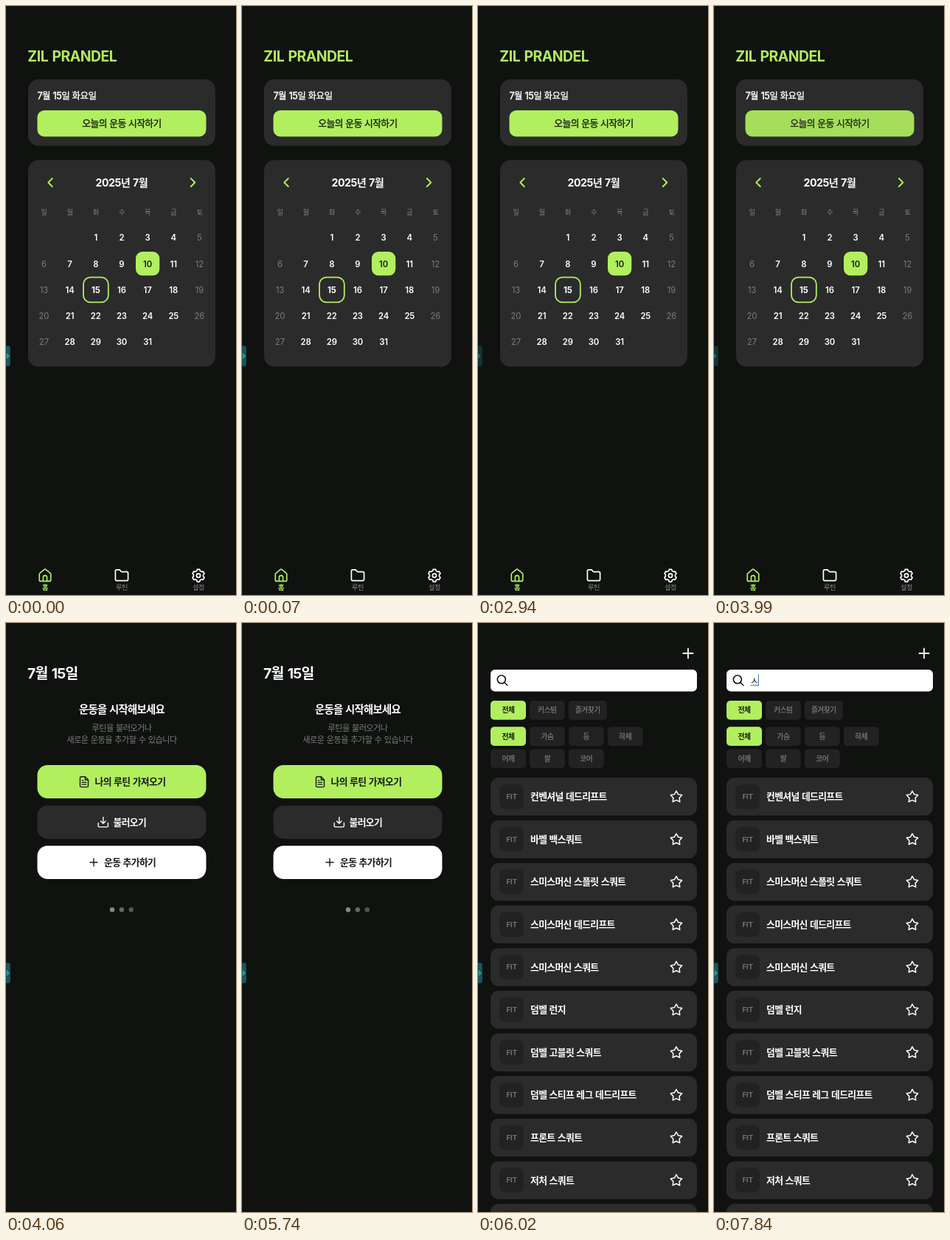
Write an HTML page with a canvas that moves like this. It is 312x796 px and loops after 8000 ms.

```html
<!DOCTYPE html>
<html lang="ko">
<head>
<meta charset="utf-8">
<title>운동 플래너</title>
<style>
html, body { margin: 0; width: 100%; height: 100%; overflow: hidden; background: #0f120f; }
canvas { display: block; width: 312px; height: 796px; }
</style>
</head>
<body>
<canvas id="stage"></canvas>
<script>
const W = 312, H = 796, LOOP = 8000, STEP = 70;
const BG = '#0f120f', CARD = '#2b2b2b', CHIP = '#222222', LIME = '#b1ef5f';
const INK = '#171b12', GREY = '#7c7c7c', WHITE = '#ffffff';
const FONT = 'Inter, "Noto Sans CJK KR", "Noto Sans CJK JP", "Noto Sans CJK", sans-serif';

const canvas = document.getElementById('stage');
const ctx = canvas.getContext('2d');
const ratio = window.devicePixelRatio || 1;
canvas.width = W * ratio;
canvas.height = H * ratio;

function box(x, y, w, h, r, fill) {
  ctx.beginPath();
  ctx.roundRect(x, y, w, h, r);
  ctx.fillStyle = fill;
  ctx.fill();
}

function pen(color, width) {
  ctx.strokeStyle = color;
  ctx.lineWidth = width;
  ctx.lineCap = ctx.lineJoin = 'round';
}

// y is the vertical middle of the letters
function text(str, x, y, size, color, weight = 500, align = 'left', tracking = -0.05) {
  ctx.font = `${weight} ${size}px ${FONT}`;
  ctx.letterSpacing = `${(size * tracking).toFixed(2)}px`;
  ctx.wordSpacing = `${(size * 0.06).toFixed(2)}px`;
  ctx.textAlign = align;
  ctx.fillStyle = color;
  const base = y + size * 0.355;
  ctx.fillText(str, x, base);
  // Hangul has no medium cut, so a hairline outline supplies it
  if (weight === 500) {
    pen(color, size * 0.025);
    ctx.strokeText(str, x, base);
  }
}

function line(color, width, ...pts) {
  ctx.beginPath();
  for (let i = 0; i < pts.length; i += 2) ctx.lineTo(pts[i], pts[i + 1]);
  pen(color, width);
  ctx.stroke();
}

// Icons live on a 24-unit grid and are centred on x, y
const ICONS = {
  home: 'M3 10a2 2 0 0 1 .7-1.5l7-6a2 2 0 0 1 2.6 0l7 6A2 2 0 0 1 21 10v9a2 2 0 0 1-2 2H5a2 2 0 0 1-2-2z M9 21v-6a3 3 0 0 1 6 0v6',
  folder: 'M4 20h16a2 2 0 0 0 2-2V8a2 2 0 0 0-2-2h-7.9a2 2 0 0 1-1.7-.9l-.8-1.2A2 2 0 0 0 7.9 3H4a2 2 0 0 0-2 2v13a2 2 0 0 0 2 2z',
  doc: 'M14 2H6a2 2 0 0 0-2 2v16a2 2 0 0 0 2 2h12a2 2 0 0 0 2-2V8z M14 2v6h6 M8 9h2 M8 13h8 M8 17h8',
  download: 'M2 14v6a2 2 0 0 0 2 2h16a2 2 0 0 0 2-2v-6 M7 10l5 5 5-5 M12 15V2',
};
for (const name in ICONS) ICONS[name] = new Path2D(ICONS[name]);

function icon(name, x, y, scale, color, width = 1.7) {
  ctx.save();
  ctx.translate(x, y);
  ctx.scale(scale, scale);
  ctx.translate(-12, -12);
  pen(color, width / scale);
  ctx.stroke(ICONS[name]);
  ctx.restore();
}

function plus(x, y, r, color, width) {
  line(color, width, x - r, y, x + r, y);
  line(color, width, x, y - r, x, y + r);
}

function ring(x, y, color, width, radii) {
  const pts = radii.map(([angle, r]) => [x + Math.sin(angle) * r, y - Math.cos(angle) * r]);
  ctx.beginPath();
  pts.forEach(p => ctx.lineTo(...p));
  ctx.closePath();
  pen(color, width);
  ctx.stroke();
}

function star(x, y) {
  const radii = Array.from({ length: 10 }, (_, i) => [i * Math.PI / 5, i % 2 ? 4.3 : 8.1]);
  ring(x, y + 0.6, WHITE, 1.5, radii);
}

function gear(x, y) {
  const radii = [];
  for (let i = 0; i < 6; i++) {
    for (const [d, r] of [[-0.34, 6.7], [-0.2, 8.5], [0.2, 8.5], [0.34, 6.7]]) {
      radii.push([i * Math.PI / 3 + d, r]);
    }
  }
  ring(x, y, WHITE, 1.7, radii);
  ctx.beginPath();
  ctx.arc(x, y, 2.6, 0, 7);
  ctx.stroke();
}

function calendar() {
  box(30, 208.3, 254, 279.2, 14, CARD);
  line(LIME, 1.9, 62.8, 233, 57.3, 238.5, 62.8, 244);
  line(LIME, 1.9, 250.8, 233, 256.3, 238.5, 250.8, 244);
  text('2025년 7월', 157, 238.5, 14.2, WHITE, 700, 'center', -0.035);
  const colX = c => 51.4 + c * 35.17;
  [...'일월화수목금토'].forEach((d, c) => text(d, colX(c), 279, 9.2, '#858585', 400, 'center'));

  box(176, 332, 32.3, 32.3, 9, LIME);
  ctx.beginPath();
  ctx.roundRect(105, 366.6, 33.8, 33.8, 9.5);
  pen(LIME, 1.8);
  ctx.stroke();

  for (let day = 1; day <= 31; day++) {
    const cell = day + 1, c = cell % 7, row = Math.floor(cell / 7);
    const weekend = c === 0 || c === 6;
    const color = day === 10 ? INK : weekend ? GREY : WHITE;
    const weight = day === 15 ? 700 : weekend ? 400 : 600;
    text(String(day), colX(c), 313.3 + row * 35.2, 11.3, color, weight, 'center', -0.01);
  }
}

// Dip in button opacity while it is tapped
function pressAlpha(t) {
  if (t < 3710) return 1;
  const k = Math.floor((t - 3710) / STEP) + 1;
  return 1 - 0.17 * Math.sin(Math.PI * Math.min(k / 6, 1));
}

function homePage(t) {
  text('ZIL PRANDEL', 29.3, 67.8, 19.4, LIME, 700, 'left', -0.025);
  box(30, 99.2, 254, 89.8, 14, CARD);
  text('7월 15일 화요일', 42.5, 122, 12.5, WHITE, 500, 'left', -0.045);
  ctx.globalAlpha = pressAlpha(t);
  box(42.5, 141, 229, 35.6, 9.5, LIME);
  text('오늘의 운동 시작하기', 157, 158.8, 12.8, INK, 500, 'center');
  ctx.globalAlpha = 1;
  calendar();

  icon('home', 53, 769.7, 0.86, LIME);
  icon('folder', 157, 769.7, 0.86, WHITE);
  gear(261, 769.7);
  text('홈', 53, 785.6, 9.2, LIME, 600, 'center');
  text('루틴', 157, 785.6, 9.2, '#8c8c8c', 400, 'center');
  text('설정', 261, 785.6, 9.2, '#8c8c8c', 400, 'center');
}

function dots(t) {
  const phases = [[5600, 136, 102, 85], [4690, 102, 102, 102], [4480, 120, 110, 85], [0, 136, 102, 85]];
  const [, ...greys] = phases.find(p => t >= p[0]);
  greys.forEach((g, i) => {
    ctx.beginPath();
    ctx.arc(144 + i * 12.9, 387.5, 3.2, 0, 7);
    ctx.fillStyle = `rgb(${g},${g},${g})`;
    ctx.fill();
  });
}

function startPage(t) {
  text('7월 15일', 29, 67.8, 19.3, WHITE, 700, 'left', -0.035);
  text('운동을 시작해보세요', 157, 117, 14.4, WHITE, 700, 'center');
  text('루틴을 불러오거나', 157, 142.5, 11.2, GREY, 400, 'center');
  text('새로운 운동을 추가할 수 있습니다', 157, 158.5, 11.2, GREY, 400, 'center');

  box(42.5, 192, 229, 45, 14, LIME);
  icon('doc', 106, 214.7, 0.69, INK, 1.4);
  text('나의 루틴 가져오기', 120.5, 214.7, 12.8, INK, 600);
  box(42.5, 246.7, 229, 45, 14, CARD);
  icon('download', 131.8, 269, 0.66, WHITE, 1.4);
  text('불러오기', 145.5, 269, 12.8, WHITE, 700);
  box(42.5, 301, 229, 45, 14, WHITE);
  plus(119, 323.5, 5, INK, 1.4);
  text('운동 추가하기', 133, 323.5, 12.8, INK, 600);
  dots(t);
}

function chip(label, x, y, w, on) {
  box(x, y, w, 25.7, 5, on ? LIME : CHIP);
  text(label, x + w / 2, y + 12.9, 9.7, on ? INK : GREY, on ? 600 : 500, 'center');
}

function searchField(t) {
  box(17, 63, 280, 29.5, 6, WHITE);
  ctx.beginPath();
  ctx.arc(31.8, 76.3, 5.5, 0, 7);
  pen('#111111', 1.6);
  ctx.stroke();
  line('#111111', 1.6, 35.8, 80.3, 39.8, 84.2);
  if (t < 7420) return;
  const typed = t >= 7840;
  if (typed) {
    text('ㅅ', 54.8, 77.5, 13, '#111111', 400, 'center', 0);
    ctx.fillStyle = '#4a86d8';
    ctx.fillRect(49.5, 83.6, 11, 1.2);
  }
  ctx.fillStyle = '#2f6fc4';
  ctx.fillRect(typed ? 59.8 : 49, 69.3, 1, 15.5);
}

const EXERCISES = ['컨벤셔널 데드리프트', '바벨 백스쿼트', '스미스머신 스플릿 스쿼트', '스미스머신 데드리프트',
  '스미스머신 스쿼트', '덤벨 런지', '덤벨 고블릿 스쿼트', '덤벨 스티프 레그 데드리프트', '프론트 스쿼트', '저처 스쿼트', ''];

function listPage(t) {
  plus(285, 41, 6.6, WHITE, 1.8);
  searchField(t);
  ['전체', '커스텀', '즐겨찾기'].forEach((s, i) => chip(s, 17 + i * 52.9, 105, i === 2 ? 52 : 48, i === 0));
  ['전체', '가슴', '등', '하체', '어깨', '팔', '코어'].forEach((s, i) =>
    chip(s, 17 + (i % 4) * 52.9, i < 4 ? 140.2 : 170.6, 48, i === 0));
  if (t < 6020) return;

  EXERCISES.forEach((name, i) => {
    const y = 209 + i * 57.6;
    box(17, y, 280, 51.3, 11, CARD);
    box(29, y + 9.2, 33, 33, 7, CHIP);
    if (!name) return;
    text('FIT', 45.7, y + 25.7, 9.5, GREY, 500, 'center', 0);
    text(name, 71, y + 25.7, 12.8, WHITE, 600);
    star(269, y + 25.5);
  });
}

// Edge handle: dims and slides out when idle, returns with the page change
function edgeTab(t) {
  const idle = t >= 2520 && t < 4060;
  const k = idle ? Math.min((Math.floor((t - 2520) / STEP) + 1) / 7, 1) : 0;
  ctx.globalAlpha = 1 - 0.5 * k;
  box(-4, 459.2, 9.8, 27.6, 3, '#1a565b');
  const x = 0.8 - 1.2 * Math.min(k * 3, 1);
  ctx.beginPath();
  ctx.moveTo(x, 468.8);
  ctx.lineTo(x + 4.3, 473);
  ctx.lineTo(x, 477.2);
  ctx.closePath();
  ctx.fillStyle = '#2a9d90';
  ctx.fill();
  ctx.globalAlpha = 1;
}

function draw(t) {
  ctx.setTransform(ratio, 0, 0, ratio, 0, 0);
  ctx.fillStyle = BG;
  ctx.fillRect(0, 0, W, H);
  const page = t < 4060 ? homePage : t < 5950 ? startPage : listPage;
  page(t);
  edgeTab(t);
}

const start = performance.now();
function tick() {
  draw((performance.now() - start) % LOOP);
  requestAnimationFrame(tick);
}
tick();
</script>
</body>
</html>
```
